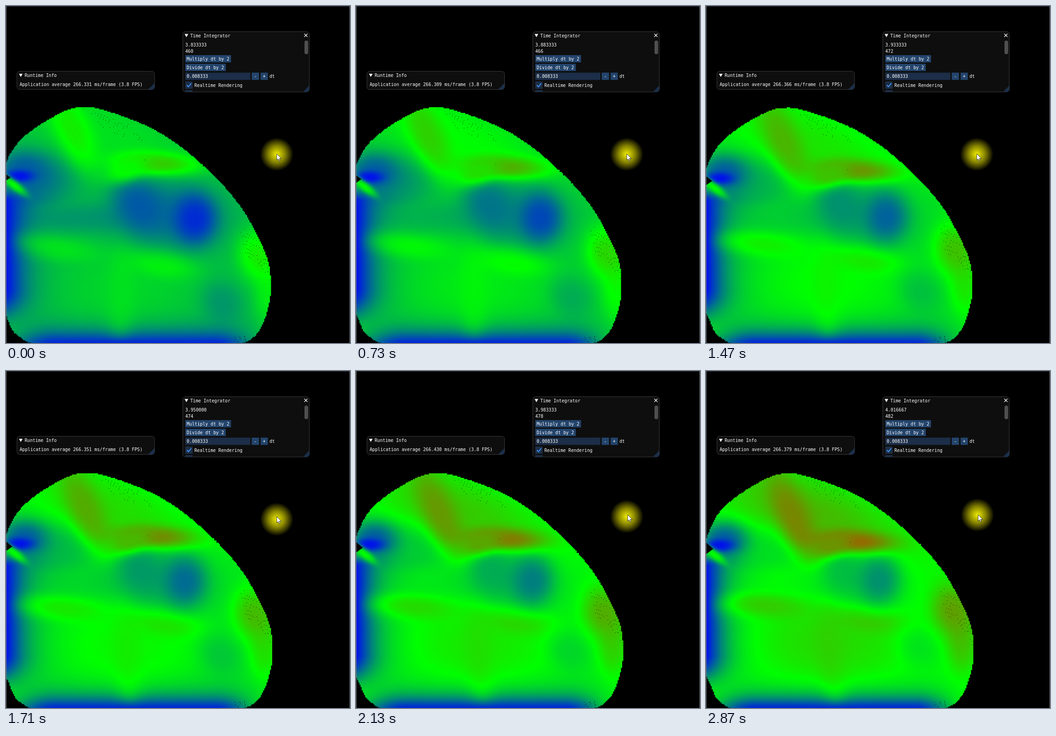
An HTML page with a canvas that plays this animation: 756x741 px, repeating every 2970 ms.

```html
<!DOCTYPE html>
<html lang="en">
<head>
<meta charset="utf-8">
<title>Time Integrator</title>
<style>
  html, body { margin: 0; width: 100%; height: 100%; overflow: hidden; background: #000; }
  canvas, svg { position: absolute; left: 0; top: 0; width: 756px; height: 741px; }
  text { font: 9.76px "DejaVu Sans Mono", monospace; fill: #fff; }
  .panel { fill: #0e0e0e; stroke: #3b3b43; }
  .button { fill: #23446c; }
  .field { fill: #1c2e48; }
  .grip { fill: #1a2f4b; }
</style>
</head>
<body>
<canvas id="view" width="756" height="741"></canvas>
<svg viewBox="0 0 756 741">
  <defs>
    <radialGradient id="halo">
      <stop offset="0" stop-color="#f0ec00"/>
      <stop offset=".5" stop-color="#868300"/>
      <stop offset="1" stop-color="#000"/>
    </radialGradient>
  </defs>
  <path d="M0 .5H756" stroke="#3a3d48"/>
  <path d="M.5 0V741M755.5 0V741" stroke="#777"/>

  <rect class="panel" x="24" y="143.5" width="302.5" height="40" rx="6"/>
  <path class="grip" d="M313 183L326 170V178Q326 183 321 183Z"/>
  <path d="M28.5 149H36.5L32.5 156Z" fill="#fff"/>
  <text x="41" y="156">Runtime Info</text>
  <text x="30" y="175.5" id="average"></text>

  <rect class="panel" x="388.5" y="56.5" width="278" height="132.5" rx="6"/>
  <path class="grip" d="M653 188.5L666 175.5V183.5Q666 188.5 661 188.5Z"/>
  <path d="M392.5 61.5H400.5L396.5 68.5Z" fill="#fff"/>
  <text x="405" y="68.5">Time Integrator</text>
  <path d="M655.5 61L662.5 68M662.5 61L655.5 68" stroke="#fff" stroke-width="1.2"/>
  <rect x="656" y="76" width="8" height="30" rx="4" fill="#4f4f4f"/>
  <text x="394" y="88.5" id="time"></text>
  <text x="394" y="103" id="count"></text>
  <path class="button" d="M394 108h100.5v16h-100.500zM394 127h89v16h-89zM540 146.500h16v16h-16zM559.500 146.500h16v16h-16z"/>
  <path class="field" d="M394 146.500h143v16h-143zM394 166h16v16h-16zM394 185h16v4h-16z"/>
  <text x="397" y="119.5">Multiply dt by 2</text>
  <text x="397" y="138.5">Divide dt by 2</text>
  <text x="397" y="158">0.008333</text>
  <text x="545" y="158">-</text>
  <text x="564.5" y="158">+</text>
  <text x="579" y="158">dt</text>
  <path d="M397.5 174L401 177.5L407 170" fill="none" stroke="#4296fa" stroke-width="2"/>
  <text x="414" y="177.5">Realtime Rendering</text>

  <circle id="glow" r="36.5" fill="url(#halo)"/>
  <path id="cursor" d="M0 0V14L3.2 11.2L5.3 16L7.5 15L5.4 10.4H10Z" fill="#fff" stroke="#111" stroke-width=".8"/>
</svg>
<script>
const W = 756, H = 741, LOOP = 2970, CELL = 4;
const $ = id => document.getElementById(id);
const ctx = $('view').getContext('2d');
const small = document.createElement('canvas');
small.width = W / CELL;
small.height = Math.ceil(H / CELL);
const smallCtx = small.getContext('2d');
const image = smallCtx.createImageData(small.width, small.height);

const stepTimes = [0, 240, 480, 730, 980, 1160, 1470, 1710, 1890, 2130, 2440, 2690];
const averages = [331, 322, 316, 309, 345, 381, 366, 351, 360, 430, 500, 379];
const cursorKeys = [[0, 595, 325], [1590, 595, 320], [1950, 597, 316], [2870, 598, 316]];
const glowKeys = [[0, 595, 326], [1890, 595, 323], [2010, 595, 320], [2440, 596.5, 316.5]];

// Key points of the body; parts beyond the stage are cut by the walls
const outline = [
  [-60, 520], [-14, 650], [1, 683], [14, 713], [30, 728], [54, 741], [120, 760], [450, 760],
  [521, 741], [545, 727], [563, 702], [577, 660], [582, 620], [575, 557], [538, 477], [503, 424],
  [453, 369], [392, 315], [332, 275], [270, 247], [205, 226], [172, 222], [140, 227], [100, 246],
  [55, 275], [22, 306], [1, 343], [-20, 400]
];

// Each group heats up and drifts towards its centre.
// Spots: x, y, rx, ry, tilt in degrees, stress
const lower = {
  cx: 420, cy: 420, pullX: .1, pullY: .18, heat: .3,
  spots: [
    [260, 630, 165, 105, 0, -.16],
    [105, 535, 105, 28, 5, -.1],
    [255, 620, 32, 95, 0, -.12],
    [340, 565, 78, 32, 10, -.02],
    [475, 650, 50, 44, 45, -.4],
    [578, 640, 34, 65, 0, -.08],
    [555, 550, 46, 62, -20, .08]
  ]
};
const upper = {
  cx: 300, cy: 440, pullX: .3, pullY: .3, heat: .4,
  spots: [
    [230, 285, 230, 85, 25, -.12],
    [65, 385, 85, 60, 0, -.52],
    [170, 467, 130, 32, 0, -.4],
    [355, 455, 130, 80, 5, -.52],
    [295, 440, 65, 50, 45, -.65],
    [415, 468, 48, 56, 0, -.83],
    [145, 268, 100, 38, 65, .07],
    [330, 346, 95, 25, 3, .2],
    [265, 358, 50, 26, -20, .02]
  ]
};
// The jet at the notch keeps its stress and only sinks
const jet = {
  cx: 0, cy: 0, pullX: 0, pullY: -.025, heat: 0,
  spots: [
    [40, 365, 55, 44, 0, -.64],
    [30, 374, 30, 13, 0, -.93],
    [18, 394, 34, 10, 38, 0]
  ]
};

const mix = (a, b, k) => a + (b - a) * k;
const fall = (d, power) => Math.exp(-Math.pow(Math.abs(d), power));
const ramp = (a, b, x) => {
  const u = Math.min(1, Math.max(0, (x - a) / (b - a)));
  return u * u * (3 - 2 * u);
};
const rand = n => {
  const v = Math.sin(n * 127.1 + 3.7) * 43758.5453;
  return v - Math.floor(v);
};
const lastIndex = (times, t) => times.reduce((n, v, i) => v <= t ? i : n, 0);

const prepare = (group, k) => group.spots.map(([x, y, rx, ry, tilt, v]) => ({
  x: mix(x, group.cx, group.pullX * k),
  y: mix(y, group.cy, group.pullY * k),
  rx, ry,
  c: Math.cos(tilt * Math.PI / 180),
  s: Math.sin(tilt * Math.PI / 180),
  v: v + group.heat * k
}));

function blend(value, spots, x, y) {
  for (const p of spots) {
    const dx = x - p.x, dy = y - p.y;
    const u = (dx * p.c + dy * p.s) / p.rx, w = (dy * p.c - dx * p.s) / p.ry;
    const q = u * u + w * w;
    if (q < 4) value += (p.v - value) * Math.exp(-Math.pow(q, 1.3));
  }
  return value;
}

// -1 is blue, 0 green, 1 red
function paintField(k) {
  const [low, high, pinned] = [lower, upper, jet].map(group => prepare(group, k));
  const base = mix(-.26, -.02, k), column = mix(250, 285, k), data = image.data;
  let n = 0;
  for (let j = 0; j < small.height; j++) {
    const y = (j + .5) * CELL;
    const wall = ramp(395, 430, y) * (1 - ramp(620, 720, y));
    const reach = 46 - 14 * fall((y - 515) / 28, 2);
    for (let i = 0; i < small.width; i++) {
      const x = (i + .5) * CELL;
      let v = blend(blend(base, low, x, y), high, x, y);
      v = mix(v, -.93, wall * fall(x / reach, 1.3));
      const rise = 30 - 9 * fall((x - column) / 30, 2);
      v = mix(v, -.86, fall((H - y) / rise, 1.3) * ramp(-30, 110, x) * (1 - ramp(460, 580, x)));
      v = blend(v, pinned, x, y);
      data[n++] = 255 * Math.max(0, v);
      data[n++] = 255 * (1 - Math.abs(v));
      data[n++] = 255 * Math.max(0, -v);
      data[n++] = 255;
    }
  }
  smallCtx.putImageData(image, 0, 0);
}

// Smooth closed curve, walked in square steps for the cell edge
function traceOutline(k) {
  const pts = outline.map(([x, y]) => [x + k * (8 - x / 300), y + k * (5 - x / 100)]);
  const at = i => pts[(i + pts.length) % pts.length];
  const snap = v => Math.round(v / 2.5) * 2.5;
  let lastY = snap(pts[0][1]);
  ctx.beginPath();
  ctx.moveTo(snap(pts[0][0]), lastY);
  pts.forEach((p, i) => {
    const a = at(i - 1), c = at(i + 1), d = at(i + 2);
    const count = Math.ceil(Math.hypot(c[0] - p[0], c[1] - p[1]));
    for (let m = 1; m <= count; m++) {
      const u = m / count;
      const [x, y] = [0, 1].map(e => snap(p[e] + .5 * u * (c[e] - a[e] +
        u * (2 * a[e] - 5 * p[e] + 4 * c[e] - d[e] + u * (3 * (p[e] - c[e]) + d[e] - a[e])))));
      ctx.lineTo(x, lastY);
      ctx.lineTo(x, y);
      lastY = y;
    }
  });
  ctx.closePath();
}

function paintNotch(k) {
  ctx.fillStyle = '#000';
  ctx.beginPath();
  ctx.moveTo(0, 370 + 7 * k);
  ctx.lineTo(10 + 6 * k, 377 + 14 * k);
  ctx.lineTo(0, 384 + 19 * k);
  ctx.fill();
}

// Rows of pinholes near the top edge and the right flank
function paintGaps(k) {
  const dot = (x, y) => ctx.fillRect(Math.round(x), Math.round(y), 1, 1);
  for (let r = 0; r < 8; r++) {
    for (let i = 0; i < 16; i++) {
      const n = r * 31 + i;
      if (rand(n) < .5 - r * .05)
        dot(170 + 36 * k + r * 5 + i * 6.5, 226 + 5 * k + r * 6 + i * 2.2);
      if (rand(n + 300) < .5)
        dot(514 + r * 2 + i * 4.5, 488 + r * 9 - 12 * k + i * i * .42);
    }
  }
  for (let i = 0; i < 14; i++) dot(497 + rand(i + 700) * 30, 724 + rand(i + 800) * 14);
  dot(mix(304, 316, k), mix(338, 376, k));
}

function paint(index) {
  const k = index / 11, count = 460 + index * 2;
  paintField(k);
  ctx.clearRect(0, 0, W, H);
  ctx.save();
  traceOutline(k);
  ctx.clip();
  ctx.drawImage(small, 0, 0, small.width * CELL, small.height * CELL);
  paintNotch(k);
  paintGaps(k);
  ctx.restore();
  $('time').textContent = (count / 120).toFixed(6);
  $('count').textContent = count;
  $('average').textContent = `Application average 266.${averages[index]} ms/frame (3.8 FPS)`;
}

function place(id, keys, t) {
  const [, x, y] = keys[lastIndex(keys.map(key => key[0]), t)];
  $(id).setAttribute('transform', `translate(${x} ${y})`);
}

let shown = -1;
const start = performance.now();
function tick(now) {
  const t = Math.max(0, now - start) % LOOP;
  const index = lastIndex(stepTimes, t);
  if (index !== shown) paint(shown = index);
  place('cursor', cursorKeys, t);
  place('glow', glowKeys, t);
  requestAnimationFrame(tick);
}
tick(start);
</script>
</body>
</html>
```
